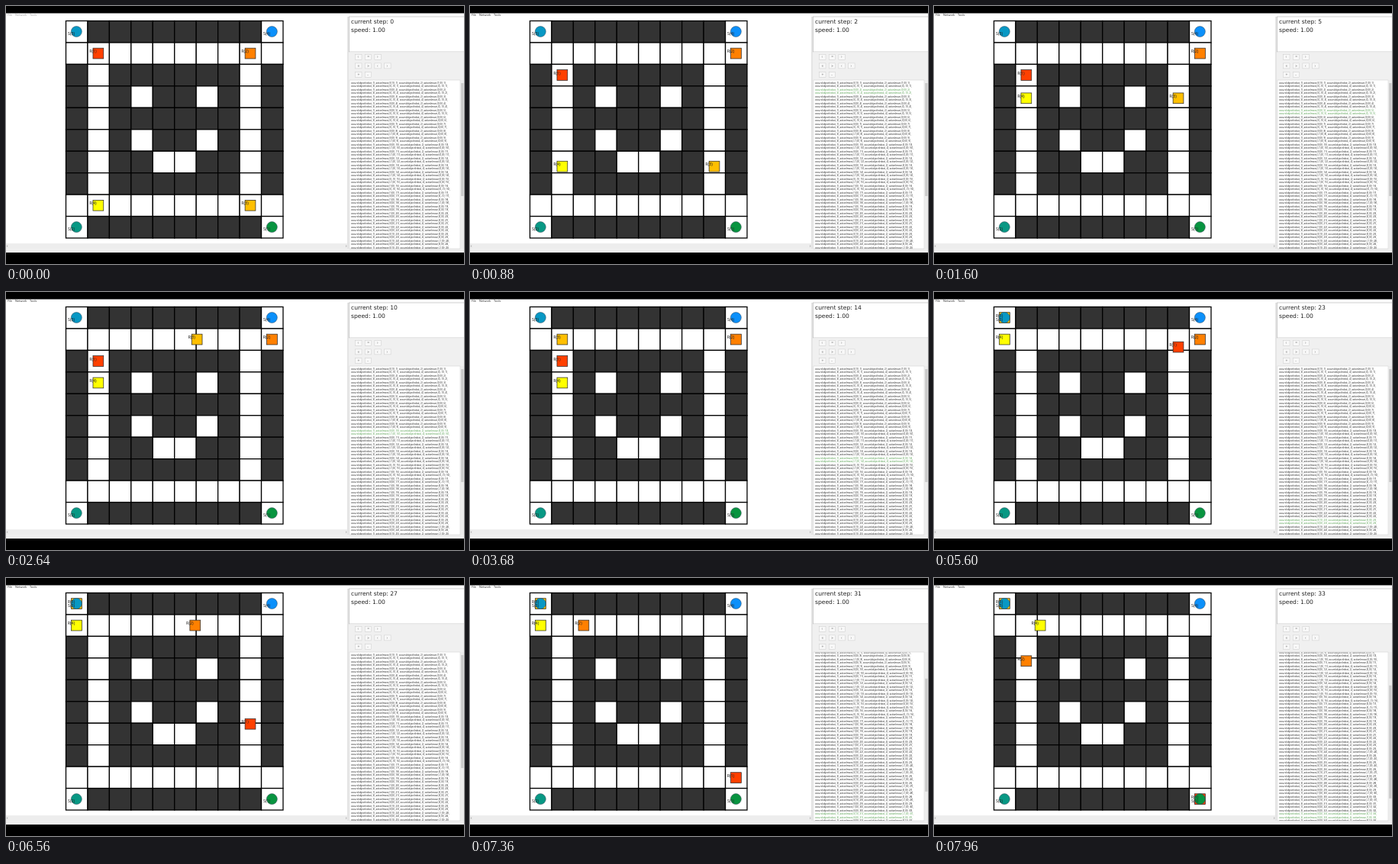
Write an HTML page with a canvas that moves like this. It is 600x338 px and loops after 8 s.

```html
<!DOCTYPE html>
<html lang="en">
<head>
<meta charset="utf-8">
<title>Robot grid</title>
<style>
  html, body { margin: 0; width: 100%; height: 100%; overflow: hidden; background: #000; }
  canvas { display: block; }
</style>
</head>
<body>
<canvas width="600" height="338"></canvas>
<script>
const ctx = document.querySelector('canvas').getContext('2d');
const LOOP = 8000, STEP_MS = 229.5, LEAD = 1.06;
const LEFT = 78.5, TOP = 19.5, CELL = 28.45;
const LINE_CHARS = 107, LINE_HEIGHT = 4.5;
const SANS = '"Noto Sans", "Open Sans", sans-serif';
const WIDE = '"DejaVu Sans", sans-serif';

const grid = [
  '.########.',
  '..........',
  '#.######.#',
  '#.#.##.#.#',
  '#.######.#',
  '#.#.##.#.#',
  '#.##..##.#',
  '#.######.#',
  '..........',
  '.########.'
];

const stations = [
  { id: 3, x: 0, y: 0, color: '#0898c4' },
  { id: 4, x: 9, y: 0, color: '#0c90fa' },
  { id: 2, x: 0, y: 9, color: '#089884' },
  { id: 1, x: 9, y: 9, color: '#089440' }
];

// Waypoints: [step, column, row]
const robots = [
  { id: 1, color: '#ff4000', path: [[1,1,1],[2,1,2],[15,1,2],[16,1,1],[23,8,1],[30,8,8],[31,9,8],[32,9,9]] },
  { id: 2, color: '#ff8000', path: [[1,8,1],[2,9,1],[24,9,1],[32,1,1],[35,1,4]] },
  { id: 3, color: '#ffbf00', path: [[1,8,8],[8,8,1],[15,1,1],[16,0,1],[17,0,0]] },
  { id: 4, color: '#ffff00', path: [[1,1,8],[6,1,3],[16,1,3],[18,1,1],[19,0,1],[32,0,1],[35,3,1]] }
];

function positionAt(path, p) {
  const next = path.findIndex(w => w[0] > p);
  if (next === 0) return path[0].slice(1);
  if (next < 0) return path[path.length - 1].slice(1);
  const [p0, x0, y0] = path[next - 1], [p1, x1, y1] = path[next];
  const k = (p - p0) / (p1 - p0);
  return [x0 + (x1 - x0) * k, y0 + (y1 - y0) * k];
}

function stepText(step) {
  return robots.map(({ id, path }) => {
    const [x0, y0] = positionAt(path, step), [x1, y1] = positionAt(path, step + 1);
    return `occurs(object(robot, ${id}), action(move,(${x1 - x0},${y1 - y0})), ${step}), `;
  }).join('');
}

// Wraps the plan into lines, each a list of runs that belong to one step
function wrapPlan(steps) {
  const lines = [[]];
  let used = 0;
  for (let step = 1; step <= steps; step++) {
    for (const word of stepText(step).split(/(?<= )|(?<=move,)/)) {
      if (used + word.trim().length > LINE_CHARS) {
        lines.push([]);
        used = 0;
      }
      const line = lines[lines.length - 1], run = line[line.length - 1];
      if (run && run.step === step) run.text += word;
      else line.push({ step, text: word });
      used += word.length;
    }
  }
  return lines;
}
const plan = wrapPlan(42);

function rect(x, y, w, h, fill, stroke, line = 0.7) {
  ctx.fillStyle = fill;
  ctx.fillRect(x, y, w, h);
  if (stroke) {
    ctx.strokeStyle = stroke;
    ctx.lineWidth = line;
    ctx.strokeRect(x, y, w, h);
  }
}

function text(str, x, y, size, color, family = SANS) {
  ctx.font = `${size}px ${family}`;
  ctx.fillStyle = color;
  ctx.fillText(str, x, y);
}

const center = (x, y) => [LEFT + (x + 0.5) * CELL, TOP + (y + 0.5) * CELL];

function drawWindow(t) {
  rect(0, 0, 600, 338, '#000');
  rect(0, 9.5, 600, 313.5, '#fff');
  const menu = t < 40 ? '#aaa' : '#333';
  text('File', 2, 12.5, 3.8, menu);
  text('Network', 12, 12.5, 3.8, menu);
  text('Tools', 31, 12.5, 3.8, menu);
  rect(0, 311, 449, 7, '#ededed');
  rect(0, 318, 600, 5, '#f0f0f0');
  text('‹', 1, 316, 5, '#666');
  text('›', 445, 316, 5, '#666');
  rect(447, 14, 2.5, 304, '#e4e4e4');
}

function drawBoard(p) {
  grid.forEach((row, y) => [...row].forEach((cell, x) =>
    rect(LEFT + x * CELL, TOP + y * CELL, CELL, CELL, cell === '#' ? '#333' : '#fff', '#000', 1.3)));

  const spots = robots.map(r => ({ ...r, at: center(...positionAt(r.path, p)) }));
  for (const { at: [x, y], color } of spots) rect(x - 7.2, y - 7, 13.8, 13.8, color, '#222');
  for (const s of stations) {
    const [x, y] = center(s.x, s.y);
    ctx.beginPath();
    ctx.arc(x - 0.4, y - 0.2, 7, 0, 7);
    ctx.fillStyle = s.color;
    ctx.fill();
    ctx.strokeStyle = '#345';
    ctx.lineWidth = 0.5;
    ctx.stroke();
    text(`S(${s.id})`, x - 11.7, y + 4.3, 5.3, '#222');
  }
  for (const { id, at: [x, y] } of spots) text(`R(${id})`, x - 12, y - 1, 5.3, '#222');
}

function drawControls(step) {
  rect(449.5, 14, 151, 46, '#fff', '#bbb');
  text(`current step: ${step}`, 452, 23.4, 7.6, '#222', WIDE);
  text('speed: 1.00', 452, 33.6, 7.6, '#222', WIDE);
  rect(449.5, 60.5, 150.5, 258, '#f0f0f0');
  ['‹=›', '«»‹›', '+-'].forEach((row, j) => [...row].forEach((sign, i) => {
    const x = 457.5 + i * 12.7, y = 63.3 + j * 11.6;
    rect(x, y, 8.5, 7, '#f8f8f8', '#ccc', 0.5);
    text(sign, x + 3, y + 5, 5, '#777');
  }));
}

function drawPlan(step) {
  const lastLine = plan.findLastIndex(line => line.some(run => run.step === step));
  const scroll = step < 28 ? 0 : lastLine * LINE_HEIGHT - 213;
  rect(450, 97, 145, 221, '#fff', '#ccc', 0.5);
  rect(595.5, 97, 4.5, 221, '#ececec');
  rect(596.2, 101 + scroll / 2, 3.2, 148, '#c9c9c9');
  ctx.save();
  ctx.beginPath();
  ctx.rect(450, 97.5, 145, 220.5);
  ctx.clip();
  plan.forEach((line, i) => {
    let x = 452;
    for (const run of line) {
      text(run.text, x, 101.8 + LINE_HEIGHT * i - scroll, 2.95, run.step === step ? '#4c9a46' : '#222');
      x += ctx.measureText(run.text).width;
    }
  });
  ctx.restore();
}

function draw(now) {
  const t = now % LOOP;
  const progress = Math.max(0, t / STEP_MS - LEAD);
  const step = Math.floor(progress);
  drawWindow(t);
  drawBoard(step + Math.min(1, (progress - step) / 0.98));
  drawControls(step);
  drawPlan(step);
}

const start = performance.now();
function frame() {
  draw(performance.now() - start);
  requestAnimationFrame(frame);
}
frame();
</script>
</body>
</html>
```
